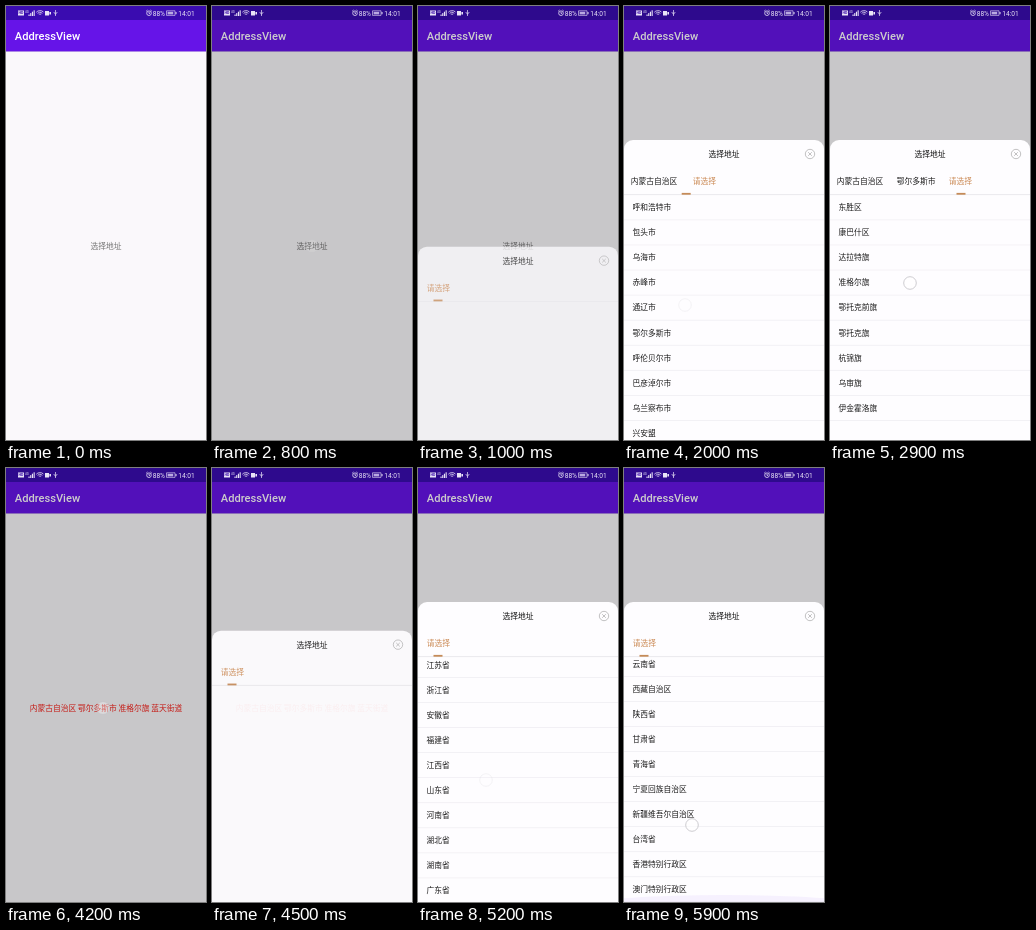
These frames come from a looping animation (200 by 434 pixels, 6000 ms). An HTML page with a canvas:

```html
<!DOCTYPE html>
<html lang="zh-CN">
<head>
<meta charset="utf-8">
<title>AddressView</title>
<style>
html, body { margin: 0; width: 100%; height: 100%; overflow: hidden; background: #faf8fb; }
canvas { display: block; width: 200px; height: 434px; }
</style>
</head>
<body>
<canvas></canvas>
<script>
const W = 200, H = 434, LOOP = 6000, STEP = 100;
const SHEET_TOP = 134, SHEET_HEIGHT = 300, LIST_TOP = 55, ROW = 25.06;
const INK = '#1c1c1c', ACCENT = '#cb8a55';
const CJK = '"Noto Sans CJK SC", "Noto Sans CJK", sans-serif', LATIN = 'Roboto, sans-serif';

const provinces = ('北京市 天津市 河北省 山西省 内蒙古自治区 辽宁省 吉林省 黑龙江省 上海市 江苏省 浙江省 ' +
  '安徽省 福建省 江西省 山东省 河南省 湖北省 湖南省 广东省 广西壮族自治区 海南省 重庆市 四川省 贵州省 云南省 ' +
  '西藏自治区 陕西省 甘肃省 青海省 宁夏回族自治区 新疆维吾尔自治区 台湾省 香港特别行政区 澳门特别行政区').split(' ');
const cities = '呼和浩特市 包头市 乌海市 赤峰市 通辽市 鄂尔多斯市 呼伦贝尔市 巴彦淖尔市 乌兰察布市 兴安盟'.split(' ');
const districts = '东胜区 康巴什区 达拉特旗 准格尔旗 鄂托克前旗 鄂托克旗 杭锦旗 乌审旗 伊金霍洛旗'.split(' ');
const towns = '兴隆街道 迎泽街道 蓝天街道 友谊街道 薛家湾镇 沙圪堵镇 大路镇 纳日松镇 龙口镇 准格尔召镇'.split(' ');
const picked = ['内蒙古自治区', '鄂尔多斯市', '准格尔旗', '蓝天街道'];

const levels = [
  { start: 0, list: provinces, tabs: [8.7], marker: 20 },
  { start: 1810, list: cities, tabs: [6.8, 68.8], marker: 80 },
  { start: 2410, list: districts, tabs: [6.8, 66.8, 118.8], marker: 131 },
  { start: 2910, list: towns, tabs: [6.8, 66.8, 118.8, 164.8], marker: 176.7 },
];
const visits = [
  { dim: 700, open: 822, fill: 1150, close: 3370 },
  { dim: 4150, open: 4260, fill: 4600, close: Infinity },
];
// time, x, y, upward travel per ms, time held
const touches = [
  [600, 100, 240, 0, 0], [1800, 61, 299, 0, 0], [2400, 75, 324, 0, 0], [2900, 80, 277, 0, 0],
  [3300, 98, 255, 0, 50], [4100, 97, 240, 0, 0],
  [4900, 68, 372, .6, 100], [5300, 70, 368, .6, 100], [5800, 68, 357, 0, 200],
];
const scrollEnd = provinces.length * ROW - (SHEET_HEIGHT - LIST_TOP);
const scrollKeys = [[4800, 0], [5000, 70], [5200, 230], [5400, 350], [5600, 510], [5800, scrollEnd]];

const canvas = document.querySelector('canvas');
const ctx = canvas.getContext('2d');
const ratio = window.devicePixelRatio || 1;
canvas.width = W * ratio;
canvas.height = H * ratio;
ctx.scale(ratio, ratio);

const clamp = v => Math.max(0, Math.min(1, v));
const ease = v => (1 - Math.cos(Math.PI * clamp(v))) / 2;

function keyed(keys, t) {
  if (t <= keys[0][0]) return keys[0][1];
  for (let i = 1; i < keys.length; i++) {
    const [t0, a] = keys[i - 1], [t1, b] = keys[i];
    if (t < t1) return a + (b - a) * (t - t0) / (t1 - t0);
  }
  return keys[keys.length - 1][1];
}

function rect(x, y, w, h, color) {
  ctx.fillStyle = color;
  ctx.fillRect(x, y, w, h);
}

function text(value, x, middle, color, { size = 7.75, family = CJK, weight = 400, align = 'left' } = {}) {
  ctx.font = `${weight} ${size}px ${family}`;
  ctx.textAlign = align;
  ctx.fillStyle = color;
  ctx.fillText(value, x, middle + size * (family === CJK ? .38 : .355));
}

function stroke(color, width, build) {
  ctx.strokeStyle = color;
  ctx.lineWidth = width;
  ctx.beginPath();
  build(ctx);
  ctx.stroke();
}

function drawStatusIcons() {
  const white = '#e9e4f6';
  const small = { size: 6.6, family: LATIN };
  rect(12, 4.5, 6, 5, white);
  text('HD', 15, 7, '#3a0cab', { size: 3.6, family: LATIN, weight: 700, align: 'center' });
  text('4G', 19, 5.5, white, { size: 3, family: LATIN });
  for (let i = 0; i < 4; i++) rect(22.5 + i * 1.7, 8.5 - i * 1.4, 1.1, 1.5 + i * 1.4, white);
  for (const r of [1.5, 3.2, 4.9]) {
    stroke(white, .8, c => c.arc(34, 9.5, r, -Math.PI * .77, -Math.PI * .23));
  }
  rect(39, 5, 4, 4.5, white);
  rect(43.4, 6, 1.6, 2.5, white);
  stroke(white, .7, c => {
    c.moveTo(49.5, 4); c.lineTo(49.5, 10);
    c.moveTo(47.7, 6); c.lineTo(49.5, 8.3); c.lineTo(51.3, 6);
  });
  stroke(white, .8, c => {
    c.arc(143, 7.2, 2.3, 0, 7);
    c.moveTo(143, 5.8); c.lineTo(143, 7.4); c.lineTo(144, 7.4);
    c.moveTo(140.2, 5.2); c.lineTo(141.5, 4);
    c.moveTo(144.5, 4); c.lineTo(145.8, 5.2);
  });
  text('88%', 146.7, 7.2, white, small);
  stroke(white, .6, c => c.rect(160.5, 4.8, 8.5, 4.6));
  rect(161.6, 5.8, 5.6, 2.6, '#b9a9e2');
  rect(169.5, 6, 1, 2.2, white);
  text('14:01', 172.2, 7.2, white, small);
}

function drawPage(t) {
  rect(0, 0, W, H, '#faf8fb');
  rect(0, 45, W, 1, '#dcd6e4');
  rect(0, 14, W, 31.4, '#6614e8');
  rect(0, 0, W, 14, '#3a0cb0');
  text('AddressView', 8.8, 30, '#fff', { size: 11.1, family: LATIN, weight: 500 });
  const done = t >= visits[0].close;
  text(done ? picked.join(' ') : '选择地址', 100, 240, done ? '#f5221b' : '#757575', { align: 'center' });
}

function drawList(items, top, scroll) {
  ctx.save();
  ctx.beginPath();
  ctx.rect(0, top + LIST_TOP, W, H);
  ctx.clip();
  items.forEach((item, i) => {
    const y = top + LIST_TOP + i * ROW - scroll;
    if (y < top || y > H) return;
    text(item, 8.6, y + 12.3, INK);
    rect(0, y + ROW - .5, W, .7, '#eeecf1');
  });
  ctx.restore();
}

function drawSheet(t, visit) {
  const closing = t >= visit.close;
  const shift = closing ? ease((t - visit.close) / 300) : 1 - ease((t - visit.open) / 300);
  if (shift >= 1) return;
  const top = SHEET_TOP + shift * SHEET_HEIGHT;
  const depth = visit === visits[0] ? levels.filter(l => t >= l.start).length - 1 : 0;
  const level = levels[depth], previous = levels[Math.max(0, depth - 1)];

  ctx.save();
  ctx.globalAlpha = 1 - .68 * shift;
  ctx.fillStyle = '#fefdff';
  ctx.beginPath();
  ctx.roundRect(0, top, W, SHEET_HEIGHT + 20, [9, 9, 0, 0]);
  ctx.fill();

  text('选择地址', 100, top + 14.2, '#111', { align: 'center' });
  stroke('#999', .6, c => {
    c.arc(186, top + 14, 4.7, 0, 7);
    c.moveTo(184.2, top + 12.2); c.lineTo(187.8, top + 15.8);
    c.moveTo(187.8, top + 12.2); c.lineTo(184.2, top + 15.8);
  });

  level.tabs.forEach((x, i) => {
    const current = i === depth;
    text(current ? '请选择' : picked[i], x, top + 41.4, current ? ACCENT : INK);
  });
  rect(0, top + LIST_TOP - .7, W, .8, '#e6e4e9');

  if (t >= visit.fill) {
    // the new list arrives one step after the tab
    const shown = t - level.start >= 90 ? level : previous;
    drawList(shown.list, top, visit === visits[1] ? keyed(scrollKeys, t) : 0);
  }
  const moved = ease((t - level.start) / 300);
  const marker = previous.marker + (level.marker - previous.marker) * moved;
  rect(marker - 4.5, top + 52.9, 9, 1.8, '#c58b58');
  ctx.restore();
}

function drawGlow(t) {
  if (t < 5800) return;
  ctx.fillStyle = 'rgba(102, 20, 232, .05)';
  ctx.beginPath();
  ctx.ellipse(100, 436, 130, 9, 0, 0, 7);
  ctx.fill();
}

function drawTouches(t) {
  for (const [start, x, y, speed, held] of touches) {
    const age = t - start;
    if (age < 0) continue;
    const alpha = 1 - clamp((age - held) / 260);
    if (!alpha) continue;
    ctx.save();
    ctx.globalAlpha = alpha;
    ctx.beginPath();
    ctx.arc(x, y - speed * Math.min(age, held), 6.3, 0, 7);
    ctx.fillStyle = 'rgba(255, 255, 255, .55)';
    ctx.fill();
    ctx.strokeStyle = '#c2c0c6';
    ctx.lineWidth = .8;
    ctx.stroke();
    ctx.restore();
  }
}

function draw(t) {
  drawPage(t);
  const visit = visits.find(v => t >= v.dim && t < v.close + 300);
  if (visit && t < visit.close) rect(0, 0, W, H, 'rgba(0, 0, 0, .2)');
  drawStatusIcons();
  if (visit) drawSheet(t, visit);
  drawGlow(t);
  drawTouches(t);
}

const began = performance.now();
function tick() {
  const t = (performance.now() - began) % LOOP;
  draw(Math.floor(t / STEP) * STEP);
  requestAnimationFrame(tick);
}
tick();
</script>
</body>
</html>
```
